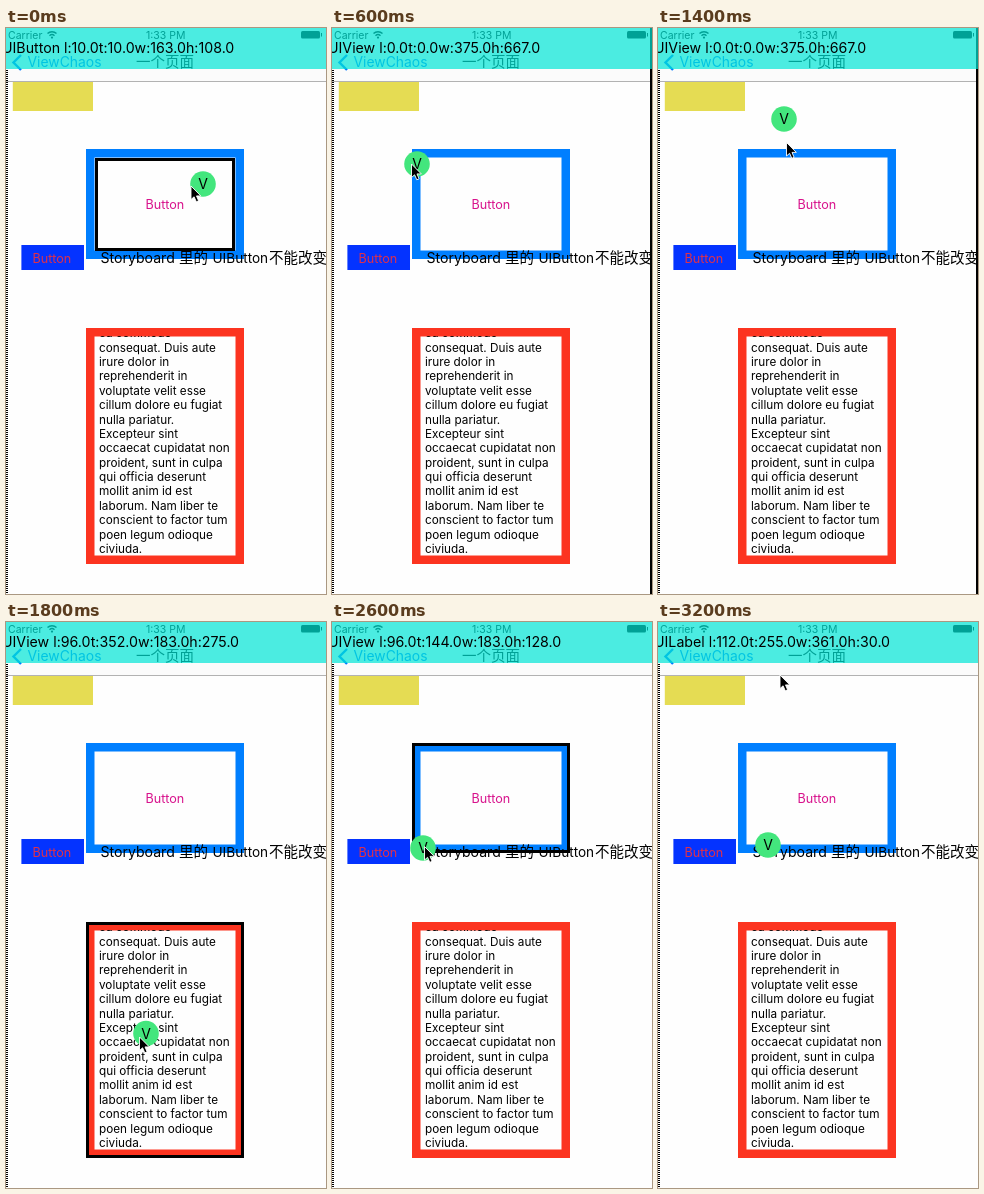
Recreate the animation shown at these times as an HTML page. Size 320x566 px, loop 3.4 s.

```html
<!DOCTYPE html>
<html lang="en">
<head>
<meta charset="utf-8">
<title>View inspector</title>
<style>
html, body { margin: 0; width: 100%; height: 100%; overflow: hidden; background: #fefefe; }
svg { display: block; width: 320px; height: 566px; font-family: Inter, Roboto, sans-serif; }
text { white-space: pre; }
.cjk { font: 14.5px "Noto Sans CJK SC", "Noto Sans CJK", sans-serif; }
</style>
</head>
<body>
<svg viewBox="0 0 320 566">
  <defs><clipPath id="page"><rect x="89" y="308" width="140" height="219"/></clipPath></defs>
  <rect width="320" height="566" fill="#fefefe"/>

  <!-- navigation bar -->
  <rect width="320" height="53" fill="#fbfbfb"/>
  <g font-size="10.5">
    <text x="2" y="10.5">Carrier</text>
    <text x="140" y="10.5">1:33 PM</text>
  </g>
  <path d="M41.5 5.5a6.5 6.5 0 0 1 9 0M43.5 7.7a3.6 3.6 0 0 1 5 0" fill="none" stroke="#000" stroke-width="1.4"/>
  <circle cx="46" cy="9.6" r="1.1"/>
  <rect x="295" y="3" width="19" height="7.5" rx="1.5"/>
  <path d="M315.5 5v3.5" stroke="#000"/>
  <path d="M15 27L7.5 34.5L15 42" fill="none" stroke="#007aff" stroke-width="2.4"/>
  <text x="21.5" y="39" font-size="13.9" fill="#007aff">ViewChaos</text>
  <text class="cjk" x="130" y="39" style="font-weight:500">一个页面</text>

  <!-- views -->
  <rect x="6.8" y="53" width="80.2" height="30" fill="#e5dc53"/>
  <path d="M0 53.5H320" stroke="#b2b2b2"/>
  <rect x="84.25" y="125.25" width="149.5" height="101.5" fill="#fefefe" stroke="#007fff" stroke-width="8.5"/>
  <text x="139.5" y="181.3" font-size="12.6" fill="#d8128c">Button</text>
  <rect x="15.4" y="217" width="62.6" height="25" fill="#0433ff"/>
  <text x="26.5" y="234.5" font-size="12.6" fill="#e0304a">Button</text>
  <text x="94.5" y="235" font-size="14.1">Storyboard</text>
  <text class="cjk" x="173" y="235">里的</text>
  <text x="206.5" y="235" font-size="13.6">UIButton</text>
  <text class="cjk" x="263" y="235">不能改变</text>
  <rect x="84.25" y="304.25" width="149.5" height="227.5" fill="#fefefe" stroke="#fc3420" stroke-width="8.5"/>
  <g id="lines" font-size="11.75" clip-path="url(#page)"></g>

  <path d="M1 42V566" stroke="#000" stroke-width="2" stroke-dasharray="1 1"/>
  <rect id="frame" fill="none" stroke="#000" stroke-width="3"/>
  <path id="edge" d="M319 0V566" stroke="#000" stroke-width="2"/>

  <!-- inspector -->
  <rect width="320" height="41" fill="#00e6d6" opacity=".7"/>
  <text id="info" x="-4" y="25" font-size="14.2"></text>
  <g id="ball">
    <circle r="12.8" fill="#43e67d"/>
    <text y="5" font-size="14" text-anchor="middle">V</text>
  </g>
  <path id="arrow" d="M0 0V13.5L3.1 10.8L5.3 15.8L7.6 14.8L5.5 9.9H9.8Z" stroke="#fff" stroke-width=".9"/>
</svg>
<script>
const $ = id => document.getElementById(id);
const STEP = 200, LOOP = 3400;

const prose = `ea commodo
consequat. Duis aute
irure dolor in
reprehenderit in
voluptate velit esse
cillum dolore eu fugiat
nulla pariatur.
Excepteur sint
occaecat cupidatat non
proident, sunt in culpa
qui officia deserunt
mollit anim id est
laborum. Nam liber te
conscient to factor tum
poen legum odioque
civiuda.`;
$('lines').innerHTML = prose.split('\n')
  .map((s, i) => `<text x="93" y="${309.3 + i * 14.38}">${s}</text>`).join('');

// inspected views: caption, then outline x, y, width, height
const views = {
  button: ['UIButton l:10.0t:10.0w:163.0h:108.0', 89, 130, 140, 93],
  root: ['UIView l:0.0t:0.0w:375.0h:667.0'],
  yellow: ['UIView l:8.0t:62.0w:94.0h:35.0', 7, 53, 80, 30],
  red: ['UIView l:96.0t:352.0w:183.0h:275.0', 80, 300, 158, 236],
  title: ['UIButtonLabel l:13.5t:6.0w:46.0h:18.0', 15, 217, 63, 25],
  blue: ['UIView l:96.0t:144.0w:183.0h:128.0', 80, 121, 158, 110],
  label: ['UILabel l:112.0t:255.0w:361.0h:30.0', 95, 217, 308, 25],
  released: ['UILabel l:112.0t:255.0w:361.0h:30.0']
};

// one pose per step: ball x, y, pointer x, y, inspected view
const poses = [
  [197, 156, 185, 158, 'button'],
  [166, 200, 158, 204, 'button'],
  [112, 190, 106, 192, 'button'],
  [85, 136, 79.5, 136, 'root'],
  [76, 106, 72, 108, 'root'],
  [62, 72, 58, 76, 'yellow'],
  [80, 74, 78, 82, 'yellow'],
  [126, 91, 128.5, 114.5, 'root'],
  [132, 312, 128, 324, 'red'],
  [140, 411.5, 133.5, 415, 'red'],
  [66, 325, 60, 326, 'root'],
  [41, 238, 35, 232.5, 'title'],
  [60, 233, 58, 231, 'title'],
  [91, 226, 92.5, 224.5, 'blue'],
  [106, 224, 106, 226, 'label'],
  [110, 223, 114, 150, 'released'],
  [110, 223, 122, 53, 'released']
];

const place = (id, x, y) => $(id).setAttribute('transform', `translate(${x} ${y})`);
const show = (id, on) => $(id).setAttribute('visibility', on ? 'visible' : 'hidden');

function draw(time) {
  const [bx, by, px, py, name] = poses[Math.floor(time % LOOP / STEP)];
  const [caption, x, y, w, h] = views[name];
  place('ball', bx, by);
  place('arrow', px, py);
  $('info').textContent = caption;
  show('edge', name === 'root');
  show('frame', w);
  if (w) {
    const box = { x: x + 1.5, y: y + 1.5, width: w - 3, height: h - 3 };
    for (const k in box) $('frame').setAttribute(k, box[k]);
  }
}

let start;
function tick(now) {
  start ??= now;
  draw(Math.max(0, now - start));
  requestAnimationFrame(tick);
}
draw(0);
requestAnimationFrame(tick);
</script>
</body>
</html>
```
